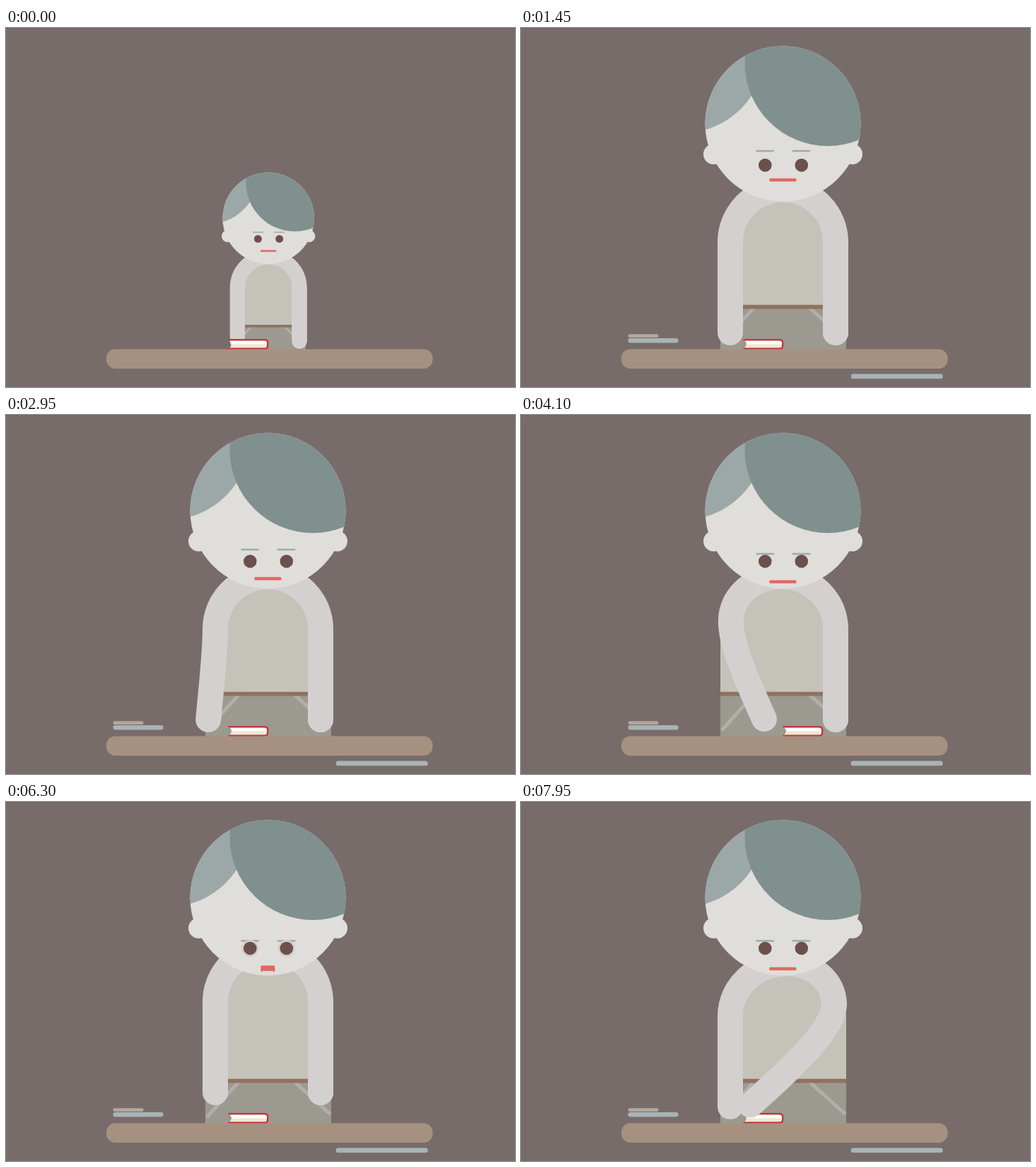
Write an HTML page that moves like this. It is 720 px wide and 508 px high and loops after 8 s.

```html
<!DOCTYPE html>
<html lang="en">
<head>
<meta charset="utf-8">
<title>Boy with a book</title>
<style>
  html, body { margin: 0; width: 100%; height: 100%; overflow: hidden; background: #786c6b; }
  svg { display: block; width: 100%; height: 100%; }
  .arm { fill: none; stroke: #d4d0cf; stroke-width: 36; stroke-linecap: round; }
  .pocket { stroke: #b2afa8; stroke-width: 5; }
  .brow { stroke: #a0aaa9; stroke-width: 2.4; }
</style>
</head>
<body>
<svg viewBox="0 0 720 508">
  <defs>
    <clipPath id="skull"><circle cx="370.5" cy="135.5" r="110"/></clipPath>
    <clipPath id="trousers"><path d="M282 397H460V456H282Z"/></clipPath>
  </defs>
  <rect width="720" height="508" fill="#786c6b"/>
  <rect width="720" height="1" fill="#6e6363"/>

  <g class="figure">
    <path d="M282 392V303A89 89 0 0 1 460 303V392Z" fill="#c5c2b9"/>
    <path d="M282 397H460V456H282Z" fill="#9c9990"/>
    <g clip-path="url(#trousers)">
      <path class="pocket" d="M284 446L331 394M406 394L459 442"/>
    </g>
    <path d="M282 391.7H460V397.5H282Z" fill="#8f725f"/>
    <path class="arm" id="arms"/>

    <g fill="#e0deda">
      <circle cx="272.5" cy="178.5" r="14.5"/>
      <circle cx="468.5" cy="178.5" r="14.5"/>
      <circle cx="370.5" cy="135.5" r="110"/>
    </g>
    <g clip-path="url(#skull)">
      <circle cx="228" cy="31.5" r="117.3" fill="#9ca8a7"/>
      <circle cx="434" cy="49.5" r="117.5" fill="#80908e"/>
    </g>
    <path class="brow" id="brows" d="M332.5 0H358M383.8 0H409.3"/>
    <g id="eyes">
      <g id="rims" fill="#d9cbc9"><circle cx="345.3" r="12"/><circle cx="396.8" r="12"/></g>
      <g fill="#6b504e"><circle cx="345.3" r="9.3"/><circle cx="396.8" r="9.3"/></g>
    </g>
    <rect id="mouth" rx="1.5" fill="#e06763"/>
    <rect id="teeth" x="362" y="239" width="16" height="2" fill="#eccfd2"/>
  </g>

  <g id="book">
    <path d="M0 441H51.5Q55.5 441 55.5 445V450Q55.5 454 51.5 454H0Q4.5 451 4.5 447.5T0 441Z" fill="#fff"/>
    <path d="M4.5 447.5H55V450Q55 453.5 51.5 453.5H0Q4.5 451 4.5 447.5Z" fill="#efe8d5"/>
    <path d="M0 441.2H51Q55.7 441.2 55.7 445.5V449.5Q55.7 453.8 51 453.8H0" fill="none" stroke="#c2393d" stroke-width="2.4"/>
  </g>
  <g class="figure"><path class="arm" id="forearm"/></g>

  <rect x="142" y="454.5" width="461.5" height="27.5" rx="12.5" fill="#a69180"/>
  <g id="lines">
    <rect x="151.5" y="433.3" height="4.8" rx="2.4" data-length="43" fill="#b3a89a"/>
    <rect x="151.5" y="439" height="6.6" rx="3.3" data-length="71" fill="#a9b4b4"/>
    <rect x="466.7" y="489.5" height="6.8" rx="3.4" data-length="130" fill="#a9b4b4"/>
  </g>
</svg>
<script>
  const LOOP = 8000, STEP = 50;
  const get = id => document.getElementById(id);
  const set = (node, attrs) => {
    for (const key in attrs) node.setAttribute(key, attrs[key]);
  };
  const figures = document.querySelectorAll('.figure');
  const lines = document.querySelectorAll('#lines rect');

  // A track is a list of [time, value] keys joined by sine easing.
  const track = (...keys) => t => {
    if (t <= keys[0][0]) return keys[0][1];
    for (let i = 1; i < keys.length; i++) {
      const [t0, a] = keys[i - 1], [t1, b] = keys[i];
      if (t < t1) return a + (b - a) * (1 - Math.cos(Math.PI * (t - t0) / (t1 - t0))) / 2;
    }
    return keys[keys.length - 1][1];
  };

  const zoom = track([0, .5886], [1000, 1]);
  const growth = track([500, 0], [1250, 1]);
  const eyeY = track([1200, 185], [1760, 207]);
  const browY = track([1200, 169], [1900, 186.5], [2600, 187], [3450, 196.5]);
  const mouthY = track([1350, 214], [1900, 228], [2600, 229], [3450, 236]);
  const leftReach = track([2550, 0], [3250, -16], [4120, 48], [4250, 48], [4900, 0]);
  const rightReach = track([4300, 0], [4850, -17], [5420, 58], [5480, 58], [6000, 0], [7000, 0], [8000, 121]);
  const bookX = track([3550, 314.5], [4100, 370.5], [5025, 370.5], [5450, 314.5]);
  const lift = track([6050, 0], [6250, 1], [6380, 1], [6500, 0]);
  const shock = track([6050, 0], [6250, 1], [6500, 1], [6700, 0]);

  // side is -1 for the left arm, 1 for the right; reach is how far the hand goes inward.
  function limb(side, reach, rise) {
    const inward = Math.max(reach, 0), x = d => 370.5 + side * (74.5 - d);
    const shoulder = [x(inward * .018), 303 - 26 * inward / (inward + 60) - rise];
    const hand = [x(reach), 431 - inward * .02 - rise];
    return {
      shoulder, hand,
      upper: [shoulder[0], shoulder[1] + (hand[1] - shoulder[1]) * .27],
      lower: [hand[0] + side * reach * .4, hand[1] - 44]
    };
  }

  function drawArms(t) {
    const rise = 20 * lift(t), dl = leftReach(t), dr = rightReach(t);
    const l = limb(-1, dl, rise), r = limb(1, dr, rise);
    const k = .552, topY = 228.5 - rise;
    const topX = 370.5 + .05 * (Math.max(dr, 0) - Math.max(dl, 0));
    const [lx, ly] = l.shoulder, [rx, ry] = r.shoulder;
    const rightForearm = `C${r.upper} ${r.lower} ${r.hand}`;
    set(get('arms'), {
      d: `M${l.hand}C${l.lower} ${l.upper} ${l.shoulder}` +
        `C${lx} ${ly - (ly - topY) * k} ${topX - (topX - lx) * k} ${topY} ${topX} ${topY}` +
        `C${topX + (rx - topX) * k} ${topY} ${rx} ${ry - (ry - topY) * k} ${rx} ${ry}` + rightForearm
    });
    set(get('forearm'), { d: `M${r.shoulder}${rightForearm}` });
  }

  function drawFace(t) {
    const s = shock(t), w = 38 - 18 * s, h = 4.5 + 4.5 * s;
    set(get('brows'), { transform: `translate(0 ${browY(t)})` });
    set(get('eyes'), { transform: `translate(0 ${eyeY(t)})` });
    set(get('rims'), { opacity: s });
    set(get('mouth'), { x: 370.4 - w / 2, y: mouthY(t) - h / 2, width: w, height: h });
    set(get('teeth'), { opacity: s });
  }

  function draw(t) {
    const pose = `translate(372.2 460.6) scale(${zoom(t)}) translate(-372.2 -460.6)`;
    figures.forEach(node => set(node, { transform: pose }));
    drawArms(t);
    drawFace(t);
    set(get('book'), { transform: `translate(${bookX(t)} 0)` });
    lines.forEach(node => set(node, { width: node.dataset.length * growth(t) }));
  }

  const start = performance.now();
  function tick() {
    const t = (performance.now() - start) % LOOP;
    draw(Math.floor(t / STEP) * STEP);
    requestAnimationFrame(tick);
  }
  tick();
</script>
</body>
</html>
```
